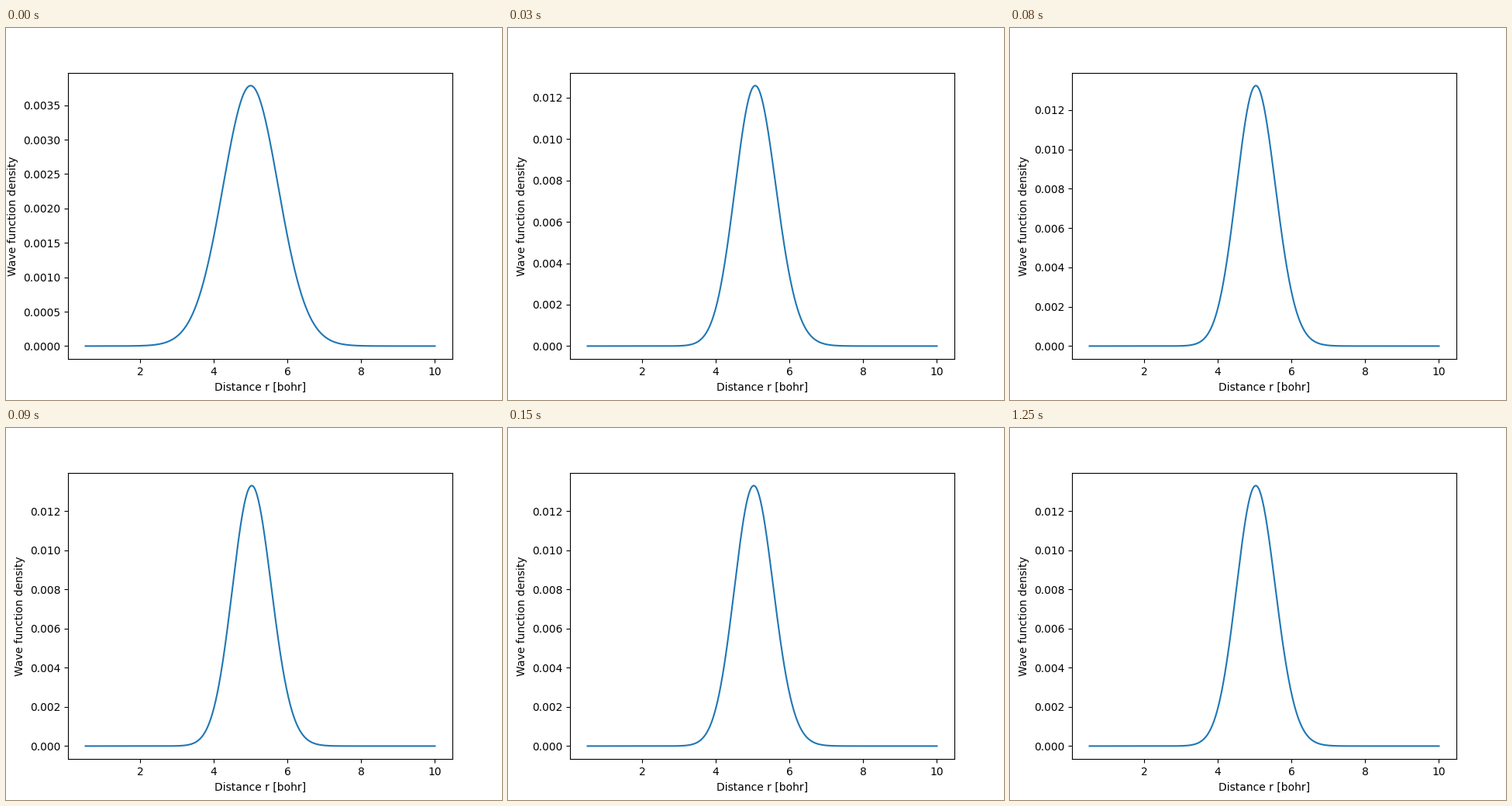
Animation of 640x480 px, one loop 1.96 s. Source, as a matplotlib script:

```python
import matplotlib.pyplot as plt
import numpy as np
from matplotlib.animation import FuncAnimation

LOOP_MS = 1960
TICK_MS = 10
STEP_MS = 30
LAST_STEP = 6

# Shape parameters: peak height, peak position, variance, skew
START = np.array([0.003785, 5.0, 0.567, 0.0])
CONVERGED = np.array([0.013304, 5.03, 0.279, 0.11])
FIRST_ERROR = np.array([-0.00072, 0.04, 0.03, 0.06])
ERROR_DECAY = 0.085
TAIL = 0.018

r = np.linspace(0.519, 10, 500)


def shape(step):
    """The initial guess, then a geometric approach to the ground state."""
    if step == 0:
        return START
    return CONVERGED + FIRST_ERROR * ERROR_DECAY ** (step - 1)


def density(step):
    """Bell curve with a cubic skew and slightly widened tails."""
    peak, center, var, skew = shape(step)
    d = r - center
    return peak * np.exp(-d**2 / (2 * var) * (1 - skew * d / 3) / (1 + TAIL * d**2))


fig, ax = plt.subplots(figsize=(6.4, 4.8), dpi=100)
line, = ax.plot(r, density(0))
ax.set_xlabel("Distance r [bohr]")
ax.set_ylabel("Wave function density")


def update(tick):
    step = min(tick * TICK_MS // STEP_MS, LAST_STEP)
    line.set_ydata(density(step))
    ax.relim()
    ax.autoscale_view()
    return line,


anim = FuncAnimation(fig, update, frames=LOOP_MS // TICK_MS,
                     interval=TICK_MS, repeat=True, repeat_delay=0)
plt.show()
```
